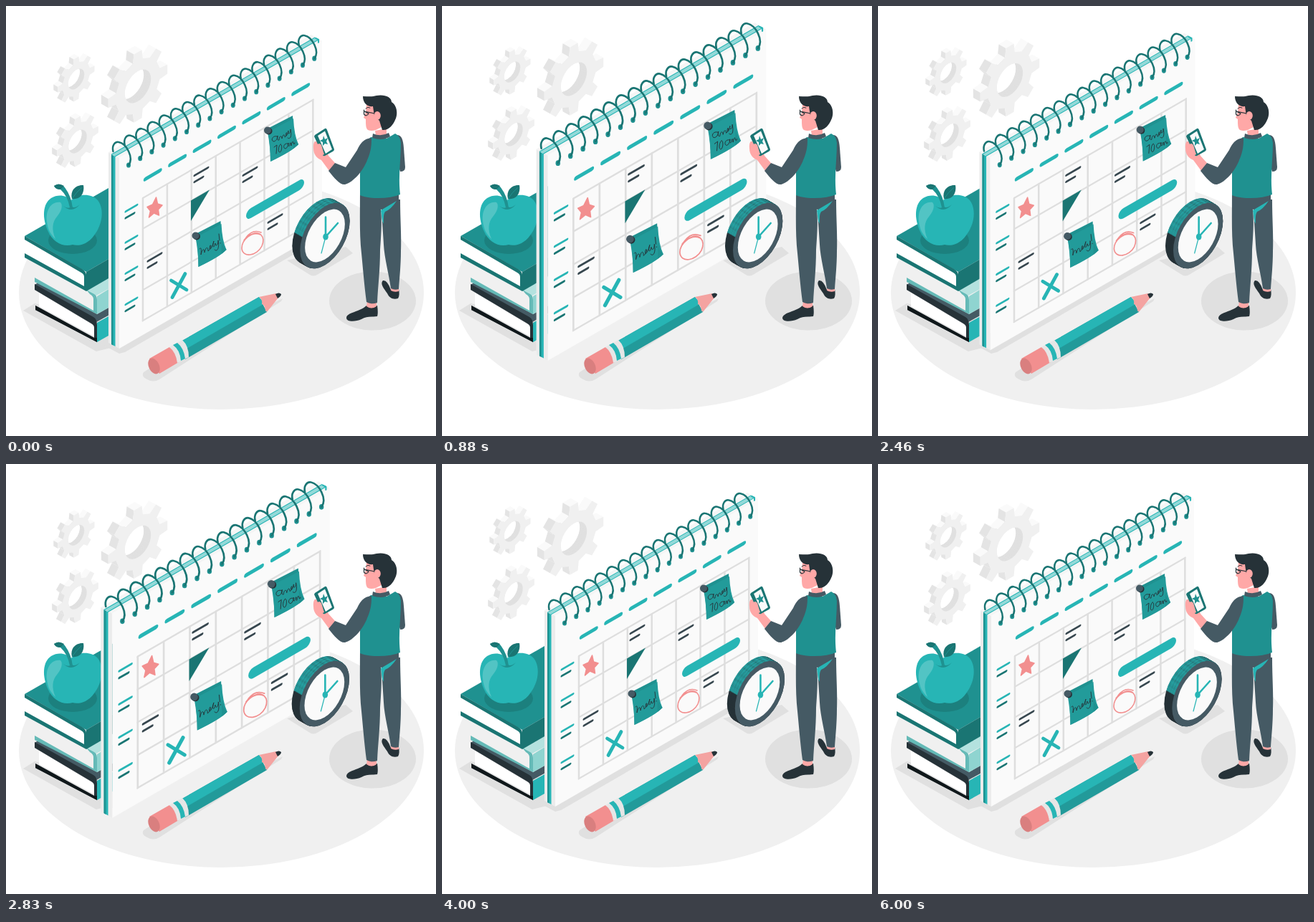
These frames come from a looping animation (600 by 600 pixels, 6.04 s). An HTML page:

```html
<!DOCTYPE html>
<html lang="en">
<head>
<meta charset="utf-8">
<title>Calendar</title>
<style>
html, body { margin: 0; width: 100%; height: 100%; overflow: hidden; background: #fff; }
svg { display: block; width: 100%; height: 100%; }
.line { fill: none; stroke-linecap: round; stroke-linejoin: round; }
.teal { fill: #27b5b5; }
.mid { fill: #1f9190; }
.deep { fill: #1a7573; }
.slate { fill: #455a64; }
.dark { fill: #263238; }
.skin { fill: #ffa8a7; }
.shade { fill: #e0e0e0; }
</style>
</head>
<body>
<svg viewBox="0 0 600 600">
  <ellipse cx="300.5" cy="400" rx="282.5" ry="163" fill="#f0f0f0"/>
  <g class="shade">
    <polygon points="24,425 40,415 150,440 150,476 126,482"/>
    <polygon points="130,470 146,462 441,306 444,322 166,483 158,485"/>
    <path d="M392 355L474 336L484 345L434 375Q429 378 424 375Z"/>
    <path d="M192 511L240 480L386 408L384 412L214 521Q205 526 197 521Q188 517 192 511Z"/>
    <ellipse cx="511.500" cy="411.500" rx="60.500" ry="41"/>
  </g>

  <g id="gears"></g>

  <g id="books">
    <polygon points="127,442 150,429 150,456 127,469" class="teal"/>
    <polygon points="40,389 46,385 127,430 150,417 150,428 126,441" class="slate"/>
    <polygon points="46,400 123,446 123,461 46,419" fill="#fff"/>
    <path d="M40 388L122 434Q127 437 127 445V469L41 424V418L123 463V449Q123 445 119 443L40 396Z" class="dark"/>
    <path d="M41 418L123 463H127V469L41 424Z" fill="#10181b"/>
    <polygon points="110,398 150,374 150,391 126,404" fill="#b4e2df"/>
    <polygon points="127,405 150,391 150,417 127,430" fill="#8fd4d0"/>
    <polygon points="46,358 123,403 123,424 46,381" fill="#f0f0f0"/>
    <path d="M40 379L122 425V409Q122 405 117 402L112 396L123 402Q127 404 127 410V430L40 385Z" fill="#65bab7"/>
    <polygon points="26,321 150,250 150,349 112,371" class="mid"/>
    <polygon points="112,371 150,349 150,376 112,398" class="deep"/>
    <polygon points="33,329 109,374 109,392 33,349" fill="#fff"/>
    <path d="M26 321L106 367Q113 371 112 378V398L26 351V345L109 391V378Q109 374 105 372L26 326Z" class="deep"/>
  </g>

  <g id="apple">
    <ellipse cx="93" cy="327" rx="34" ry="19" fill="#1c807e"/>
    <path d="M91 271C100 262 119 261 128 271C138 284 134 306 123 320C113 334 100 335 93 333C79 337 65 329 59 315C50 296 51 276 63 268C73 262 84 264 91 271Z" class="teal"/>
    <path d="M76 274C64 272 55 284 57 300C58 311 62 319 69 325C63 311 65 301 71 294C77 287 80 278 76 274Z" fill="#52c4c4"/>
    <path d="M80 279Q92 290 103 277Q96 283 92 280Q86 284 80 279Z" class="mid"/>
    <path d="M93 282Q91 264 81 252Q75 247 67 251Q69 256 76 256Q86 265 89 281Z" class="mid"/>
    <path d="M67 251Q73 246 81 251L76 256Q69 256 67 251Z" class="deep"/>
    <path d="M92 269C89 257 98 249 108 250C110 261 104 271 92 269Z" class="deep"/>
    <path d="M92 269Q98 260 105 254" class="line" stroke="#1f9190"/>
  </g>

  <g id="calendar">
    <polygon points="143,204 158,212 158,478 143,470" fill="#ececec"/>
    <polygon points="143,204 426,40 441,49 158,212" fill="#f5f5f5"/>
    <polygon points="147,207 152.500,210 152.500,475 147,472" class="teal"/>
    <polygon points="147,207 149.500,208.500 149.500,473.500 147,472" class="mid"/>
    <polygon points="147,207 152.500,210 436,47 431,44" fill="#93d9d8"/>
    <path d="M147.500 207L431 44M152 210L436 47" class="line" stroke="#27b5b5"/>
    <path d="M432 45L436 47V51" class="line" stroke="#27b5b5" stroke-width="2"/>
    <polygon points="158,212 441,49 441,315 158,478" fill="#fafafa"/>
    <g id="face" class="line" transform="matrix(1 -.577 0 1 158 212)"></g>
    <polygon points="258,271.500 284,256.500 258,300" class="deep"/>
    <path d="M230.500 383L252 396M250 373.500L232 406.500" class="line" stroke="#27b5b5" stroke-width="4.800"/>
    <path d="M209.500 267L211.500 276L218 278L212.500 284L213.500 292L206.500 289L199.500 295L201.500 286L197 280.500L204.500 277Z" fill="#f28f8f" stroke="#f28f8f" stroke-width="1.500" stroke-linejoin="round"/>
    <path d="M355 319C343 314 329 326 329 338C330 352 350 349 357 335C363 321 353 314 344 318C338 320 334 324 332 327M335 323Q344 311 356 316" class="line" stroke="#f28f8f" stroke-width="1.600"/>
    <g id="note">
      <path d="M365 171L400 153Q401 181 408 193Q400 202 369 217Q369 194 365 171Z" class="mid"/>
      <path d="M365 176L401 157Q402 180 408 193Q400 202 369 217Q369 197 365 176Z" fill="#229b9a"/>
      <path d="M401 178Q403 189 408 193L401 199Z" class="mid"/>
      <circle cx="366.500" cy="174.500" r="5" class="dark"/>
      <circle cx="365" cy="173.500" r="5" class="slate"/>
    </g>
    <use href="#note" x="-100.500" y="147"/>
    <g class="line" stroke="#263238" stroke-width=".9">
      <path d="M378 182C371 180 369 189 374 189C378 188 379 183 379 181C378 186 379 188 381 187C381 181 385 180 385 185C386 179 389 178 389 183C392 182 393 175 391 177C389 183 393 182 394 174C393 180 397 179 397 172C399 181 397 187 393 184"/>
      <path d="M374 197L378 194L377 206M383 193C380 195 379 204 382 204C385 204 386 192 383 193M393 192C387 191 386 199 390 199C393 198 394 193 394 191C393 196 395 197 396 194C396 190 398 189 398 195C399 188 401 188 401 192Q402 194 403 191"/>
      <path d="M270 339C272 336 273 338 272 347C274 338 277 338 277 344C279 335 282 336 282 342C286 339 287 333 285 334C282 342 287 341 290 328C287 338 291 338 292 331C293 337 296 333 296 327C298 337 295 344 291 340M297 318L298 327M299 330.500V331"/>
    </g>
    <g id="rings"></g>
  </g>

  <g id="clock">
    <g id="case"></g>
    <g transform="matrix(.845 -.5 0 1 445 320.500)">
      <circle r="41" class="slate"/><circle r="33" fill="#fafafa"/>
    </g>
    <g class="line" stroke="#27b5b5" stroke-width="2.600">
      <path d="M446 322V294.500M446 322L463 303"/><path d="M446 322L440 345" stroke-width="1.200"/>
    </g>
    <ellipse cx="446" cy="322" rx="3.800" ry="4.500" class="teal"/>
  </g>

  <g id="pencil">
    <polygon points="244,468 353,406 364,427 250,493" fill="#229a9a"/>
    <polygon points="244,468 353,406 361,415 249,480" class="teal"/>
    <path d="M353 406L377 401L380 407L364 427Q363 423 362 427Q362 417 357 416Q358 409 353 406Z" fill="#f4a3a1"/>
    <path d="M376 402Q381 399 384 402Q384 405 379 408Z" class="dark"/>
    <path d="M200 492L228 476Q238 481 241 497L214 513Z" fill="#f28f8f"/>
    <ellipse cx="206.500" cy="502.500" rx="7.300" ry="11.500" transform="rotate(-25 206.500 502.500)" fill="#d97f7f"/>
    <path d="M228 476L246 466Q255 474 255 490L239 498Q237 483 228 476Z" fill="#e6e6e6"/>
    <path d="M233 473L239 470Q248 477 250 492L244 495Q243 480 233 473Z" class="teal"/>
  </g>

  <g id="man">
    <path d="M526 383C521 388 529 396 532 401C535 408 541 410 547 408C549 405 549 400 548 395L537 396Q532 382 526 383Z" class="dark"/>
    <path d="M537 392H548V398Q542 400 537 397Z" class="skin"/>
    <path d="M475 435C476 427 494 427 503 418L518 418C519 424 519 430 518 433C509 434 503 433 496 437C487 441 475 441 475 435Z" class="dark"/>
    <path d="M504 412H517V419Q510 424 503 419Z" class="skin"/>
    <path d="M524 270H550C550 298 552 322 551 342C551 362 549 380 548 395Q542 397 537 394C534 373 528 352 527 333C526 316 525 302 524 286Z" class="slate"/>
    <path d="M494 260H548V272L523 284C525 300 523 325 522 340C522 370 519 390 518 414Q510 417 503 413C500 390 498 366 496 345C493 320 494 290 494 260Z" class="slate"/>
    <path d="M523 285L545 272Q537 284 529 287Q526 291 527 304L525 300Z" class="teal"/>
    <path d="M544 180C552 179 554 186 555 198L557 225Q557 231 550 231L545 215Z" class="slate"/>
    <path d="M509 183L531 185L543 178Q550 181 551 191C551 215 547 238 550 263Q538 268 520 268Q502 268 494 264V213C497 200 500 190 509 183Z" class="mid"/>
    <path d="M515 174L531 171V181Q524 185 516 181Z" class="skin"/>
    <path d="M512 178Q523 183 534 177L536 182Q526 189 511 184Z" class="slate"/>
    <path d="M459 219L450 209C447 201 444 195 441 190L437 195C434 186 428 186 429 199C429 208 435 213 440 215L451 230Z" class="skin"/>
    <path d="M510 184C499 185 494 192 490 201L474 225L459 219L450 230C458 240 466 250 473 249C485 246 499 229 504 215C510 202 510 192 510 184Z" class="slate"/>
    <path d="M431 180L445 171Q447 170 448 173L458 200Q458 202 456 203L445 209Q443 210 442 208L430 182Z" class="deep"/>
    <path d="M435 181L445 174.500L455 200L446 206Z" fill="#fafafa"/>
    <path d="M443 181L445 186L449 184L447 189L449 193L445 192L442 195L442 190L438 188L442 186Z" class="mid"/>
    <path d="M434 194Q437 190 440 194L444 207L437 210Q433 203 434 194Z" class="skin"/>
    <path d="M503 137L502 148L499 156Q501 157 502 158C502 165 502 171 505 173Q510 175 516 173L530 166L526 145L512 137Z" class="skin"/>
    <path d="M498 126C505 126 511 127 517 125C528 123 538 127 538 134C546 139 547 151 543 159C540 166 534 174 525 173L521 160L514 154L512 140C506 141 498 137 498 126Z" class="dark"/>
    <ellipse cx="518" cy="153" rx="4.800" ry="6" class="skin"/>
    <path d="M499.500 145V151Q503 155 506 150L500 147L514 150" class="line" stroke="#263238" stroke-width="1.200"/>
    <path d="M502 143Q505 140 508 142" class="line" stroke="#263238"/>
  </g>
</svg>
<script>
const byId = id => document.getElementById(id);
const range = n => [...Array(n).keys()];
const TEAL = '#27b5b5', DEEP = '#1a7573', SLATE = '#37474f';
const stroke = (d, color, width) => `<path d="${d}" stroke="${color}" stroke-width="${width}"/>`;

// Gears lie on the calendar's plane; their sides run up and to the left by DEPTH.
const DEPTH = [-11.5, -11.3];
const TOOTH = [[36, -.28], [48, -.17], [48, .17], [36, .28]];
const RIM = range(8).flatMap(i => TOOTH.map(([r, k]) => {
  const a = (i + k) * Math.PI / 4;
  return [r * Math.cos(a), r * Math.sin(a)];
}));
const ring = (r, d) => `M${r} 0A${r} ${r} 0 1 0 ${-r} 0A${r} ${r} 0 1 0 ${r} 0Z`;

function gearSides() {
  const back = ([u, v]) => [u + DEPTH[0], v + DEPTH[1]];
  return RIM.map((p, i) => [p, RIM[(i + 1) % RIM.length]])
    .filter(([p, q]) => (q[1] - p[1]) * DEPTH[0] - (q[0] - p[0]) * DEPTH[1] > 0)
    .sort(([p, q], [r, s]) => r[0] + r[1] + s[0] + s[1] - p[0] - p[1] - q[0] - q[1])
    .map(([p, q]) => {
      const upward = Math.abs(q[0] - p[0]) > Math.abs(q[1] - p[1]);
      return `<polygon points="${[p, q, back(q), back(p)].join(' ')}" fill="${upward ? '#fafafa' : '#e4e4e4'}"/>`;
    }).join('');
}
function gear(x, y, scale) {
  const bore = range(20).map(i => {
    const k = 1 - i / 20;
    return `<path d="${ring(21)}${ring(25)}" fill="#e0e0e0" fill-rule="evenodd" transform="translate(${DEPTH[0] * k} ${DEPTH[1] * k})"/>`;
  }).join('');
  return `<g transform="translate(${x} ${y}) scale(${scale}) matrix(.866 -.5 0 1 0 0)">${bore}${gearSides()}
    <path d="M${RIM.join('L')}Z${ring(21)}" fill="#f0f0f0" fill-rule="evenodd"/></g>`;
}
byId('gears').innerHTML = gear(184, 112, 1) + gear(98, 102, .62) + gear(100, 189, .7);

// Calendar sheet, in flat coordinates before the skew.
const pair = (u, v, long, short, first, second) =>
  stroke(`M${u} ${v}h${long}`, first, 3) + stroke(`M${u} ${v + 9}h${short}`, second, 3);
byId('face').innerHTML =
  range(8).map(i => stroke(`M${33 + i * 33.9} 75v171`, '#dedede', 2.5)).join('') +
  range(5).map(i => stroke(`M33 ${75 + i * 42.75}h237.3`, '#dedede', 2.5)).join('') +
  range(7).map(i => stroke(`M${36.5 + i * 34.4} 50.5h20.5`, TEAL, 5.5)).join('') +
  range(4).map(i => pair(9, 80 + i * 43.2, 16, 12, TEAL, DEEP)).join('') +
  [[105, 85], [173, 124], [40, 167], [208, 210]].map(([u, v]) => pair(u, v, 19, 12, SLATE, SLATE)).join('') +
  stroke('M184 183h67', TEAL, 14);

byId('rings').innerHTML = range(17).map(i => `<g transform="translate(${i * 16.2} ${i * -9.3})">
  <ellipse cx="171" cy="222" rx="3" ry="3.600" class="mid"/>
  <path d="M149.500 203C147.500 195 152 188.500 157.500 190C168 192 179 212 171 222" class="line" stroke="${DEEP}" stroke-width="2.500"/></g>`).join('');

// Clock case: stacked slices, dark below and teal above.
const UPPER = 'M-37.5 -16.5A41 41 0 0 1 37.5 -16.5Z';
byId('case').innerHTML = range(23).map(i => {
  const d = 11 - i / 2;
  return `<g transform="matrix(.845 -.5 0 1 ${445 - d} ${320.5 - d * .577})">
    <circle r="41" class="dark"/><path d="${UPPER}" class="teal"/></g>`;
}).join('');

function tween(keys, time) {
  const i = Math.max(1, keys.findIndex(([at]) => at >= time));
  const [[t0, a], [t1, b]] = [keys[i - 1], keys[i]];
  return a + (b - a) * (time - t0) / (t1 - t0);
}
const BEAT = [[0, 1], [600, 1.1], [1800, 1], [2400, 1], [3000, 1.1], [3600, 1], [6000, 1]];
const SHAKE = [0, -1, 2, -4, 4, -4, 4, -4, 2, -1, 0].map((x, i) => [i * 300, x * 1.2]);
const FLOAT = [[0, 0], [750, -12], [1500, 0]];

function render(ms) {
  const t = ms % 6040 % 6000;
  byId('gears').setAttribute('transform', `translate(0 ${tween(FLOAT, t % 1500)})`);
  byId('calendar').setAttribute('transform', `translate(291.5 259) scale(${tween(BEAT, t)}) translate(-291.5 -259)`);
  byId('clock').setAttribute('transform', `translate(${tween(SHAKE, t % 3000)} 0)`);
}
const start = performance.now();
function frame() {
  render(performance.now() - start);
  requestAnimationFrame(frame);
}
frame();
</script>
</body>
</html>
```
